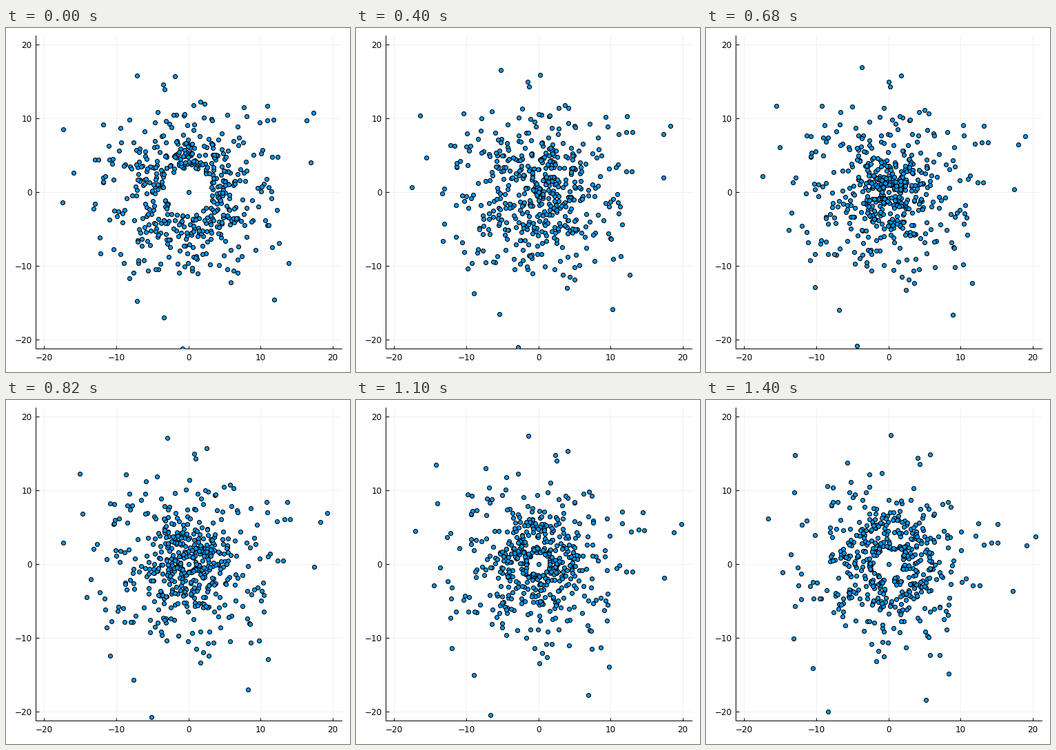
A matplotlib script that plays this animation: 499x499 px, repeating every 1.42 s.

```python
import numpy as np
import matplotlib.pyplot as plt
from matplotlib.animation import FuncAnimation

SIZE = 499
DPI = 128
PX = 72 / DPI          # one pixel in points
TICK_MS = 20
FRAMES = 71
STEPS = 31
SUBSTEPS = 80
STARS = 500
SPEED = 0.2575         # every star starts on a tangent at this speed
INNER, SPREAD, OUTER = 3.2, 5.5, 15

# The few stars that stand alone at the rim
RIM = np.array([
    (-7.1, 15.75), (-1.85, 15.7), (10.9, 11.7), (11.85, 9.75),
    (17.3, 10.75), (16.4, 9.65), (16.95, 3.95), (13.9, -9.65),
    (11.9, -14.65), (-0.8, -21.25), (-3.4, -17.05), (-7.15, -14.8),
    (-17.45, -1.45), (-15.95, 2.6), (-17.35, 8.5),
])


def disc(count):
    """Ring of stars, thinning outwards like half a bell curve."""
    rng = np.random.default_rng(11)
    r = INNER + np.abs(rng.normal(0, SPREAD, 2 * count))
    r = r[r < OUTER][:count]
    a = rng.uniform(0, 2 * np.pi, count)
    return np.column_stack((r * np.cos(a), r * np.sin(a)))


def pull(pos):
    return -pos / np.sum(pos ** 2, axis=1, keepdims=True) ** 1.5


def orbit(pos):
    """Clockwise orbits around a unit mass. The plain Euler steps
    add a little energy to stars that pass close to the centre."""
    radius = np.hypot(pos[:, 0], pos[:, 1])[:, None]
    vel = SPEED * np.column_stack((pos[:, 1], -pos[:, 0])) / radius
    dt = 1 / SUBSTEPS
    path = [pos]
    for _ in range(STEPS - 1):
        for _ in range(SUBSTEPS):
            pos, vel = pos + vel * dt, vel + pull(pos) * dt
        path.append(pos)
    return path


def step_at(frame):
    """Of every three steps the middle one is held for five ticks."""
    group, tick = divmod(frame, 7)
    return 3 * group + (0 if tick == 0 else 1 if tick < 6 else 2)


path = orbit(np.vstack((RIM, disc(STARS - len(RIM)))))

# Plot area in pixels, then the origin and scale of the data
left, right, top, bottom = 42.5, 487, 11, 464.5
cx, cy, sx, sy = 264.5, 237.7, 10.4625, 10.7

fig = plt.figure(figsize=(SIZE / DPI, SIZE / DPI), dpi=DPI, facecolor="white")
ax = fig.add_axes([left / SIZE, 1 - bottom / SIZE,
                   (right - left) / SIZE, (bottom - top) / SIZE])
ax.set_xlim((left - cx) / sx, (right - cx) / sx)
ax.set_ylim((cy - bottom) / sy, (cy - top) / sy)

marks = range(-20, 21, 10)
names = [str(m).replace("-", "\u2212") for m in marks]
ax.set_xticks(marks, names)
ax.set_yticks(marks, names)
ax.tick_params(direction="in", length=4.5 * PX, width=PX,
               labelsize=12 * PX, labelfontfamily="DejaVu Sans")
ax.tick_params(axis="x", pad=7.5 * PX)
ax.tick_params(axis="y", pad=5 * PX)
ax.grid(color="#f0f0f0", linewidth=PX)
ax.set_axisbelow(True)
for side, spine in ax.spines.items():
    spine.set_linewidth(PX)
    spine.set_visible(side in ("left", "bottom"))

dots, = ax.plot([], [], "o", ms=6 * PX, mfc="#009afa", mec="black",
                mew=1.1 * PX, zorder=3)


def draw(frame):
    stars = path[step_at(frame)]
    dots.set_data(np.append(stars[:, 0], 0), np.append(stars[:, 1], 0))
    return dots,


anim = FuncAnimation(fig, draw, frames=FRAMES, interval=TICK_MS, repeat=True)
plt.show()
```
